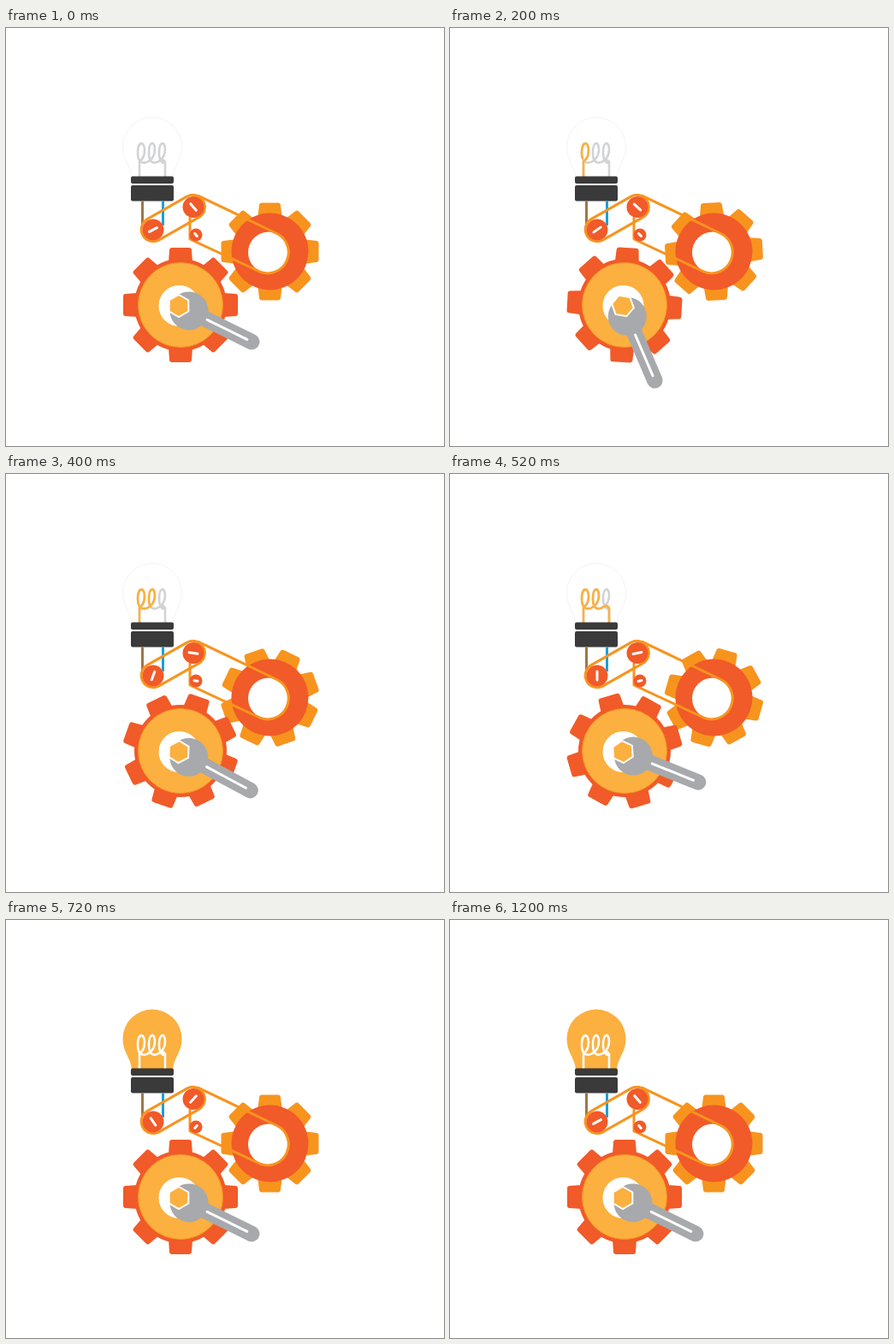
Write an HTML page that moves like this. It is 512 by 489 pixels and loops after 1.52 s.

```html
<!DOCTYPE html>
<html>
<head>
<meta charset="utf-8">
<style>
  html, body { margin: 0; height: 100%; overflow: hidden; background: #fff; }
  svg { display: block; width: 100vw; height: 100vh; }
  .red { fill: #f15a29; }
  .line { fill: none; stroke-linecap: round; stroke-linejoin: round; }
  .belt { stroke: #f7941e; stroke-width: 3; }
  .coil { stroke-width: 2.6; }
  .slot { stroke: #fff; stroke-width: 3; }
  .teeth { stroke-width: 6; stroke-linejoin: round; }
</style>
</head>
<body>
<svg viewBox="0 0 512 489">
  <defs>
    <path id="tooth1" d="M-11 -50L-10 -64H10L11 -50Z"/>
    <path id="tooth2" d="M-11 -42L-9.5 -54H9.5L11 -42Z"/>
    <path id="coil" pathLength="100" d="M156 174V156C161 153 162 148 162 143C162 132 154 132 154 146C154 160 163 159 168 155C173 151 174 146 174 142C174 132 167 132 167 146C167 160 175 159 180 155Q184 153 186 157V174"/>
    <path id="lastLoop" d="M180 155C185 151 186 146 186 142C186 132 179 132 179 146C179 155 183 159 186 157"/>
  </defs>

  <path id="bulb" d="M147 175C146 161 136.500 155 136.500 139A34.500 34.500 0 0 1 205.500 139C205.500 155 196 161 195 175Z"/>
  <g id="filament" class="line coil"><use href="#coil"/><use href="#lastLoop"/></g>
  <use id="glow" class="line coil" href="#coil" stroke="#fbb040"/>
  <g fill="#3a3a3a">
    <rect x="146" y="173.500" width="50" height="8.500" rx="2"/>
    <rect x="146" y="184" width="50" height="18.500" rx="2"/>
  </g>
  <path d="M159.500 202.500V230" stroke="#a0764a" stroke-width="3"/>
  <path d="M183.500 202.500V231" stroke="#1c9fda" stroke-width="3"/>

  <g transform="translate(308.500 261.500)">
    <g id="gear2" class="teeth" fill="#f7941e" stroke="#f7941e"></g>
    <circle class="red" r="45"/>
    <circle cx="-1.500" cy="1" r="24" fill="#fff"/>
  </g>
  <g transform="translate(204 324)">
    <g id="gear1" class="teeth red" stroke="#f15a29"></g>
    <circle class="red" r="54"/>
    <circle r="49.500" fill="#fbb040" stroke="#f7941e"/>
    <circle cx="-1.500" cy="1" r="24" fill="#fff"/>
  </g>

  <path class="line belt" d="M225 196.300L317.700 241A24.500 24.500 0 0 1 296.800 285.200L215 247V222"/>
  <path class="line belt" d="M164.500 223.900L212 196.900A14 14 0 0 1 226 221.100L178.500 248.100A14 14 0 0 1 164.500 223.900Z"/>
  <g id="pulleys"></g>

  <g transform="translate(202 325)">
    <g id="wrench" class="line">
      <path d="M14 0H95" stroke="#a7a9ac" stroke-width="18.500"/>
      <circle cx="13.400" r="22.500" fill="#a7a9ac"/>
      <path class="slot" d="M37 0H89"/>
    </g>
    <path id="nut" d="M0 -13L11.300 -6.500V6.500L0 13L-11.300 6.500V-6.500Z" fill="#fbb040" stroke="#fff" stroke-width="2"/>
  </g>
</svg>
<script>
const LOOP = 1520, STEP = 40, LIT = 600, START = 160, REST = 26.3, SWING = 40.5;
const $ = id => document.getElementById(id);
const rotate = (el, deg) => el.setAttribute('transform', `rotate(${deg})`);
const progress = (t, from, to) => Math.min(1, Math.max(0, (t - from) / (to - from)));
const outBack = (p, s = 3.6) => 1 + (s + 1) * (p - 1) ** 3 + s * (p - 1) ** 2;

for (const n of [1, 2]) {
  for (let a = 0; a < 360; a += 45)
    $('gear' + n).innerHTML += `<use href="#tooth${n}" transform="rotate(${a})"/>`;
}

// x, y, radius, half slot length, resting slot angle
const pulleys = [[172, 236, 12.5, 5, -28], [219, 209.5, 12.5, 5, 50], [222, 242, 7.5, 2, 50]];
$('pulleys').innerHTML = pulleys.map(([x, y, r, h]) =>
  `<g transform="translate(${x} ${y})"><circle class="red" r="${r}"/>` +
  `<path class="line slot" d="M${-h} 0H${h}"/></g>`).join('');
const slots = document.querySelectorAll('#pulleys .slot');

function draw(t) {
  const turn = 45 * progress(t, START, 720);
  rotate($('gear1'), turn);
  rotate($('gear2'), -turn);

  const spin = 180 * progress(t, START, 1200);
  slots.forEach((slot, i) => rotate(slot, pulleys[i][4] - spin));

  const swing = SWING * (outBack(progress(t, 0, 200)) - outBack(progress(t, 360, 560)));
  rotate($('wrench'), REST + swing);
  rotate($('nut'), swing);

  const lit = t >= LIT, drawn = 100 * progress(t, 0, 520);
  $('bulb').setAttribute('fill', lit ? '#fbb040' : '#fff');
  $('bulb').setAttribute('stroke', lit ? 'none' : '#f4f4f4');
  $('filament').setAttribute('stroke', lit ? '#fff' : '#d1d3d4');
  $('glow').setAttribute('stroke-dasharray', `${drawn} 200`);
  $('glow').setAttribute('visibility', lit || !drawn ? 'hidden' : 'visible');
}

function tick() {
  draw(Math.floor(performance.now() % LOOP / STEP) * STEP);
  requestAnimationFrame(tick);
}
tick();
</script>
</body>
</html>
```
